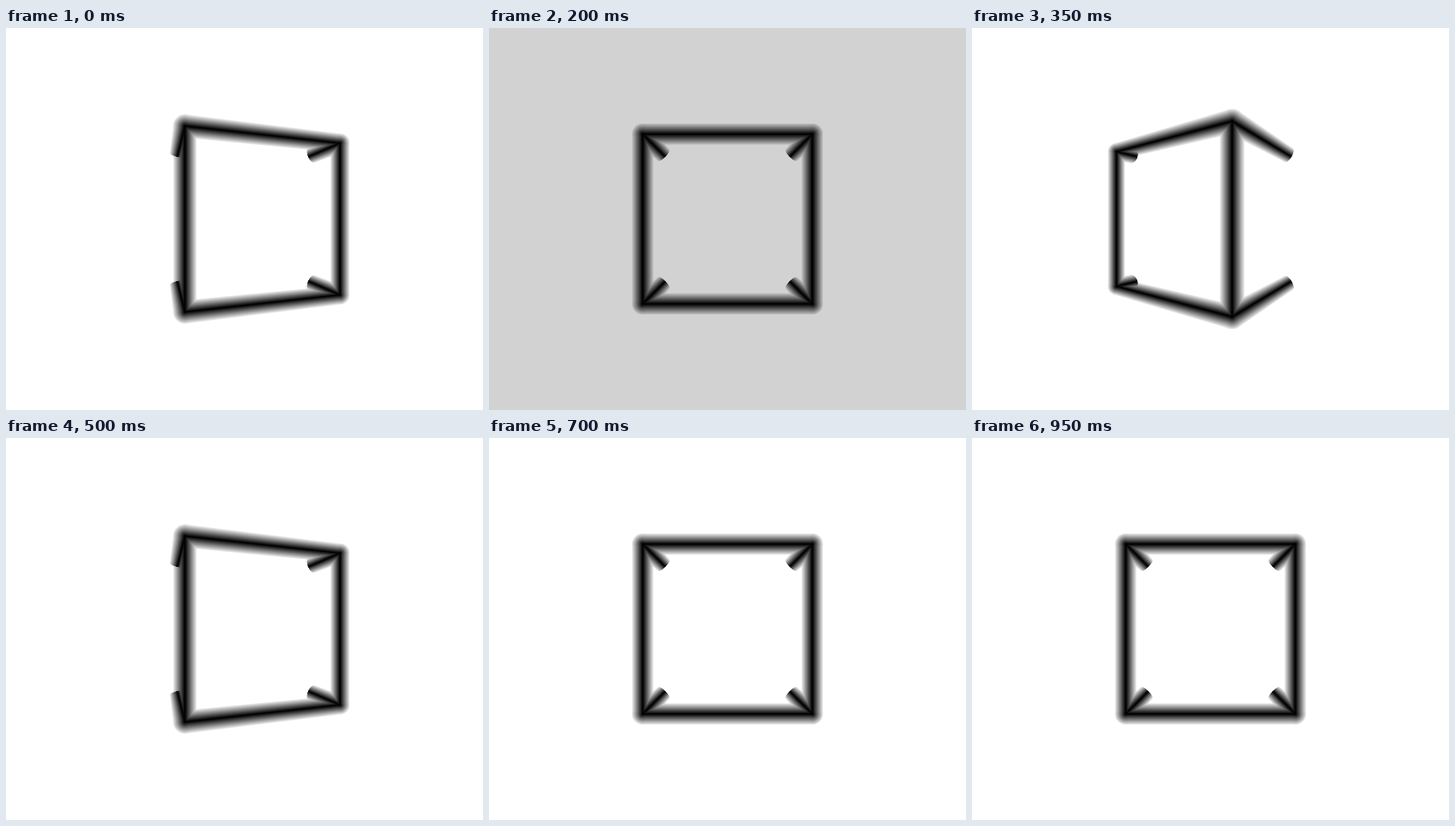
An HTML page with a canvas for the animation above (1 s loop, 600 by 480 pixels).

```html
<!DOCTYPE html>
<html lang="en">
<head>
<meta charset="utf-8">
<title>Turning cube</title>
<style>
  html, body { margin: 0; width: 100%; height: 100%; overflow: hidden; background: #fff; }
  canvas { display: block; }
</style>
</head>
<body>
<canvas id="stage" width="600" height="480"></canvas>
<script>
const ctx = document.getElementById('stage').getContext('2d');
const LOOP = 1000, STEP = 50, TURN = 18;
const FOCAL = 320, EYE = 4, RADIUS = 0.125, LAYERS = 36;
const FLASH = 4;       // the one dimmed step
const DIM = 210 / 255;

function project([x, y, z]) {
  const s = FOCAL / (EYE - z);
  return { x: 300 + x * s, y: 240 + y * s, r: RADIUS * s };
}

// Corners of one horizontal face, in order around the vertical axis
function ring(y, turn) {
  return [0, 1, 2, 3].map(i => {
    const a = (turn - 45 + i * 90) * Math.PI / 180;
    return [Math.SQRT2 * Math.sin(a), y, Math.SQRT2 * Math.cos(a)];
  });
}

// Adds an edge to the path, keeping only what lies in front of depth cut
function addEdge(a, b, cut, w) {
  if (a[2] < b[2]) [a, b] = [b, a];
  if (a[2] <= cut) return;
  const clipped = b[2] < cut;
  if (clipped) {
    const t = (a[2] - cut) / (a[2] - b[2]);
    b = a.map((v, i) => v + (b[i] - v) * t);
  }
  const p = project(a), q = project(b);
  const len = Math.hypot(q.x - p.x, q.y - p.y);
  const nx = (p.y - q.y) / len * w, ny = (q.x - p.x) / len * w;
  ctx.beginPath();
  ctx.moveTo(p.x + nx * p.r, p.y + ny * p.r);
  ctx.lineTo(q.x + nx * q.r, q.y + ny * q.r);
  ctx.lineTo(q.x - nx * q.r, q.y - ny * q.r);
  ctx.lineTo(p.x - nx * p.r, p.y - ny * p.r);
  ctx.fill();
  for (const end of clipped ? [p] : [p, q]) {
    ctx.beginPath();
    ctx.arc(end.x, end.y, end.r * w, 0, Math.PI * 2);
    ctx.fill();
  }
}

function draw(step) {
  const light = step === FLASH ? DIM : 1;
  const gray = v => {
    const g = Math.round(v * light);
    return `rgb(${g},${g},${g})`;
  };
  ctx.fillStyle = gray(255);
  ctx.fillRect(0, 0, 600, 480);

  const turn = (step + 1) * TURN % 90;
  const top = ring(-1, turn), bottom = ring(1, turn);
  // Wide pale layers first, thin dark ones last
  for (let k = LAYERS; k > 0; k--) {
    const w = k / LAYERS;
    const cut = -0.085 * Math.sqrt(1 - w * w);
    ctx.fillStyle = gray(236 * (k - 1) / (LAYERS - 1));
    for (let i = 0; i < 4; i++) {
      const j = (i + 1) % 4;
      addEdge(top[i], top[j], cut, w);
      addEdge(bottom[i], bottom[j], cut, w);
      if (top[i][2] > 0) addEdge(top[i], bottom[i], cut, w);
    }
  }
}

let shown = -1;
function tick() {
  const step = Math.floor(performance.now() % LOOP / STEP);
  if (step !== shown) draw(shown = step);
  requestAnimationFrame(tick);
}
tick();
</script>
</body>
</html>
```
